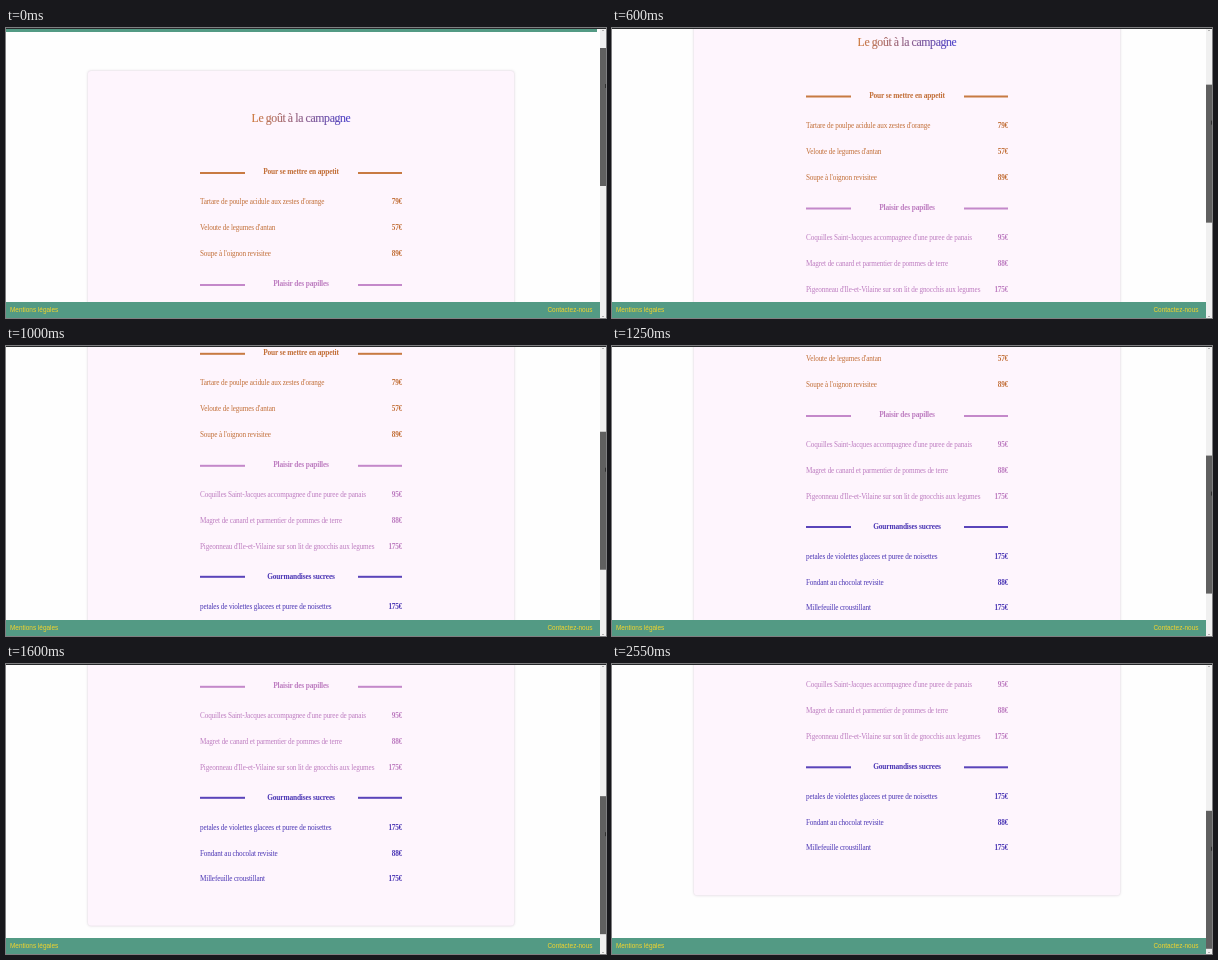
Write an HTML page that moves like this. It is 600 px wide and 290 px high and loops after 2600 ms.

```html
<!DOCTYPE html>
<html lang="fr">
<head>
<meta charset="utf-8">
<title>Menu</title>
<style>
@property --y { syntax: "<number>"; inherits: true; initial-value: 0; }

html, body { margin: 0; width: 100%; height: 100%; overflow: hidden; }
body { background: #fefefe; }

.stage {
  position: relative;
  width: 600px;
  height: 290px;
  overflow: hidden;
  animation: scroll 2600ms infinite;
}
.stage div, .stage span, .stage i { position: absolute; white-space: nowrap; }

/* scroll offset in px, advancing every 50 ms */
@keyframes scroll {
  0% { --y: 0; animation-timing-function: steps(7); }
  13.4615% { --y: 37.4; animation-timing-function: steps(5); }
  23.0769% { --y: 76.5; animation-timing-function: steps(8); }
  38.4615% { --y: 137.2; animation-timing-function: steps(5); }
  48.0769% { --y: 187; animation-timing-function: steps(7); }
  61.5385% { --y: 234.2; animation-timing-function: steps(3); }
  67.3077% { --y: 251; animation-timing-function: steps(4); }
  75%, 100% { --y: 264.7; }
}

.page { inset: 0; transform: translateY(calc(var(--y) * -1px)); }
.header { top: 0; left: 0; width: 591px; height: 4px; background: #539a84; }
.card {
  left: 82px; top: 43px; width: 426px; height: 452.5px;
  border-radius: 3px;
  background: #fef5fd;
  box-shadow: 0 0 2.5px rgba(90, 50, 90, .28);
}

.title, .section { font-family: "Liberation Serif", "Times New Roman", serif; }
.title {
  left: 295px; top: 82px;
  transform: translateX(-50%);
  font-size: 11.8px; line-height: 16px; letter-spacing: -.38px;
  color: transparent;
  background: linear-gradient(90deg, #cf7a3e, #4a40cc);
  -webkit-background-clip: text;
  background-clip: text;
  -webkit-text-stroke: .15px transparent;
}

.section { left: 194px; width: 202px; height: 100px; color: var(--ink); }
.section h2 {
  position: absolute; left: 0; top: 0; width: 100%; margin: 0;
  text-align: center;
  font-size: 7.4px; line-height: 10px; letter-spacing: -.15px;
}
.section h2::before, .section h2::after {
  content: ""; position: absolute; top: 4.6px;
  width: 44.5px; height: 2px; background: var(--bar);
}
.section h2::before { left: 0; }
.section h2::after { right: 0; }
.row {
  left: 0; width: 100%; height: 10px;
  top: calc(30px + var(--n) * 25.8px);
  font-size: 7.2px; line-height: 10px; letter-spacing: -.13px;
}
.row b { position: absolute; right: 0; letter-spacing: -.2px; }

.starters { top: 139.2px; --ink: #c26f38; --bar: #c87a42; }
.mains { top: 251px; --ink: #bd7cc0; --bar: #c488ca; }
.sweets { top: 362.8px; --ink: #4a35b4; --bar: #5a44ba; }

.topline { left: 0; top: 0; width: 600px; height: 1px; background: #26282a; }
.footer {
  left: 0; top: 274px; width: 594px; height: 16px;
  background: #539a84; color: #f4d52c;
  font: 6.45px/15px "Liberation Sans", Arial, sans-serif;
}
.footer span { top: 0; }

.bar { left: 594px; top: 0; width: 6px; height: 290px; background: #f0f0f0; }
.thumb {
  left: .3px; top: 20.3px; width: 5.7px; height: 138px;
  background: #606060;
  transform: translateY(calc(var(--y) * .479px));
}
.pointer { right: 0; top: 36px; width: 1px; height: 4px; background: #303030; }
.arrow { left: 2px; border: 1.5px solid transparent; }
.up { top: 1px; border-bottom-color: #707070; }
.down { bottom: 0; border-top-color: #707070; }
</style>
</head>
<body>
<div class="stage">
  <div class="page">
    <div class="header"></div>
    <div class="card"></div>
    <div class="title">Le goût à la campagne</div>

    <div class="section starters">
      <h2>Pour se mettre en appetit</h2>
      <div class="row" style="--n:0">Tartare de poulpe acidule aux zestes d'orange<b>79€</b></div>
      <div class="row" style="--n:1">Veloute de legumes d'antan<b>57€</b></div>
      <div class="row" style="--n:2">Soupe à l'oignon revisitee<b>89€</b></div>
    </div>

    <div class="section mains">
      <h2>Plaisir des papilles</h2>
      <div class="row" style="--n:0">Coquilles Saint-Jacques accompagnee d'une puree de panais<b>95€</b></div>
      <div class="row" style="--n:1">Magret de canard et parmentier de pommes de terre<b>88€</b></div>
      <div class="row" style="--n:2">Pigeonneau d'Ile-et-Vilaine sur son lit de gnocchis aux legumes<b>175€</b></div>
    </div>

    <div class="section sweets">
      <h2>Gourmandises sucrees</h2>
      <div class="row" style="--n:0">petales de violettes glacees et puree de noisettes<b>175€</b></div>
      <div class="row" style="--n:1">Fondant au chocolat revisite<b>88€</b></div>
      <div class="row" style="--n:2">Millefeuille croustillant<b>175€</b></div>
    </div>
  </div>

  <div class="footer">
    <span style="left:4px">Mentions légales</span>
    <span style="right:7.5px">Contactez-nous</span>
  </div>
  <div class="bar">
    <i class="arrow up"></i>
    <div class="thumb"><i class="pointer"></i></div>
    <i class="arrow down"></i>
  </div>
  <div class="topline"></div>
</div>
</body>
</html>
```
